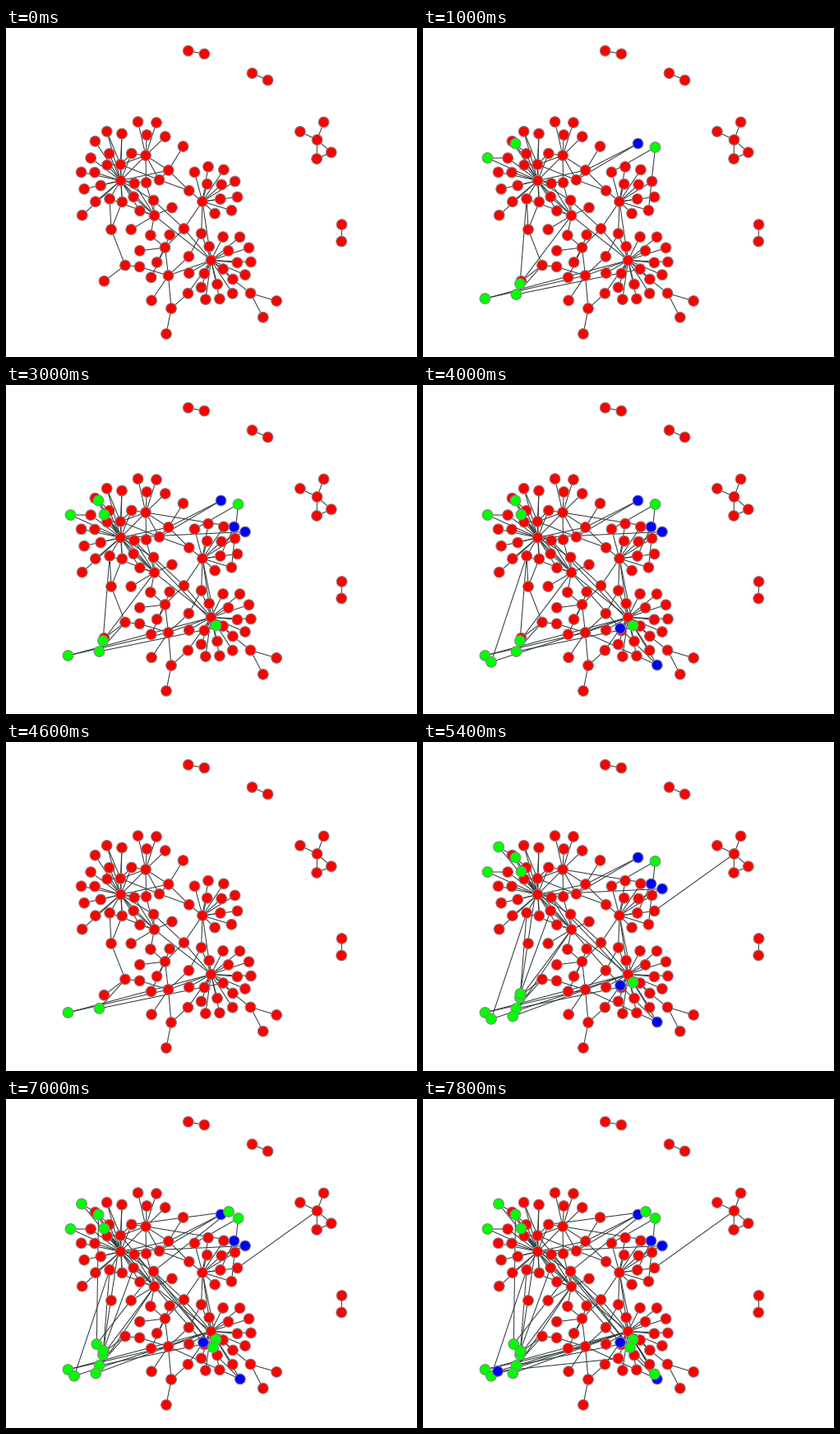
Write a matplotlib script that moves like this. It is 500 by 400 pixels and loops after 8000 ms.

```python
import matplotlib.pyplot as plt
import numpy as np
from matplotlib.animation import FuncAnimation
from matplotlib.collections import LineCollection

W, H, DPI = 500, 400, 100
FRAMES, STEP = 40, 200
CYCLE = 11
RED, GREEN, BLUE = "#ff0000", "#00ff00", "#0000ff"
RIM, LINE = "#858585", "#303a3a"

pos, links = {}, []


def cluster(name, x, y, *fans):
    """A hub with fans of leaves, numbered in order and linked to it."""
    pos[name] = (x, y)
    leaves = [p for f in fans for p in fan(x, y, *f)]
    for i, leaf in enumerate(leaves, 1):
        pos[f"{name}{i}"] = leaf
        links.append([(x, y), leaf])


def fan(x, y, r, start, end=0, n=1, bulge=0):
    """n points on an arc between two angles, pushed outwards mid-way."""
    t = np.linspace(0, 1, n)
    a = np.radians(start + (end - start) * t)
    r = r + bulge * np.sin(np.pi * t)
    return list(zip(x + r * np.cos(a), y + r * np.sin(a)))


def pairs(text):
    return [[pos[n] for n in pair.split("-")] for pair in text.split()]


cluster("A", 139.5, 185.5, (45.5, 167, 217, 3, 3.5), (57, 237, 271.5, 3, 5),
        (25, 166, 229, 3, 8), (35.5, 247, 292, 3, -16), (26, 86, 121, 2),
        (40, 140), (63, 138), (17, 12))
cluster("B", 170, 155, (42, -103, -72, 2), (25, -87), (33, -44), (33, 33, 89, 3, 1))
cluster("D", 239, 211, (37, -105, 17, 6, 10), (22, -75, -8, 3, 9),
        (21, 44), (21, -141), (39, 92))
cluster("E", 249.5, 282.5, (45, -39, 23, 4, 4), (48, 57, 98, 3), (32, -63, 5, 3, -8),
        (35, 41, 110, 3, -5), (18, 36, 117, 2), (31, 150), (17, 262), (49, 125))
cluster("F", 180.5, 228, (33, 149), (23.5, -24), (24.5, 101),
        (18.5, 198, 267, 2), (34, 222))
cluster("G", 193.5, 267, (31, 173), (20.5, 119), (40, 115), (16.5, -70), (32.5, -45))
cluster("H", 197.5, 301, (36.5, 124, 197, 2), (34, -43))
cluster("J", 145, 288.5, (32, 143))
cluster("K", 201, 341, (31.5, 101))
cluster("L", 297.5, 322.5, (33, 16.5, 62.5, 2))
cluster("N", 378.5, 136, (23, 41.5, 91, 2), (23, 206, 290.5, 2))
cluster("P", 221.7, 27.7, (20, 11))
cluster("Q", 299.5, 55, (20.8, 24))
cluster("R", 408.5, 239, (20.5, 91))
cluster("S", 215.5, 144)
cluster("T", 128, 245)
core = list(pos.values())

links += pairs("""A-B A-F A-B5 A-B7 A-F4 A-F5 A-F6 B-A11 B-A12 A5-A11 A6-A11
A9-A11 A12-A11 A11-B6 A11-A13 A14-F A17-F B7-F B5-S B5-D11 B5-B6 B6-D11 F5-G5
F-E G5-E G5-D D-E D12-E D12-H3 G-H H-E H-K K-E18 J-H2 F3-G E14-E11 E11-L N1-N2""")
early = pairs("A14-T A13-T J-T")   # gone once the far link appears
far = pairs("D5-N")
FAR_FROM = 16

# Newcomers in order of arrival; V is green, U is blue.
NEW = [
    ("V1", 75.5, 329, "E H"),
    ("V2", 113.5, 324, "J E14"),
    ("V3", 118, 311, "A14 F"),
    ("V4", 78.5, 158, "A3 A"),
    ("V5", 112.5, 140.5, "A A10"),
    ("V6", 282.5, 145, "D1 D6"),
    ("U1", 261.5, 140.5, "B5 B6"),
    ("U2", 277.5, 172.5, "B D9"),
    ("U3", 291, 178.5, "A D8"),
    ("V7", 255.5, 292.5, "A17 D"),
    ("V8", 119.5, 157.5, "A F"),
    ("U5", 284.8, 340.5, "E H"),
    ("U4", 240, 296, "F U5"),
    ("V10", 83, 336.8, "A14 E"),
    ("V12", 118.3, 306, "A11 F6"),
    ("V9", 92, 127.5, "A4 A"),
    ("V11", 109.3, 333.5, "F H"),
    ("V14", 110.3, 298, "V5 F5"),
    ("V15", 252, 302, "A11 F5"),
    ("V13", 271, 137, "A12 F5"),
    ("U6", 91, 331, "E E13"),
    ("V16", 281.7, 334.5, "E V15"),
]
pos.update({name: (x, y) for name, x, y, _ in NEW})


def arrived(frame):
    """Slow growth; each cycle opens by falling back to two newcomers."""
    if frame == 0:
        return 0
    cycle, step = divmod(frame - 1, CYCLE)
    return 5 + 5 * cycle + step // 2 if step else 2


fig = plt.figure(figsize=(W / DPI, H / DPI), dpi=DPI, facecolor="white")
ax = fig.add_axes([0, 0, 1, 1])
ax.set(xlim=(0, W), ylim=(H, 0))
ax.axis("off")

edges = LineCollection([], colors=LINE, linewidths=0.75, zorder=1)
ax.add_collection(edges, autolim=False)
dots = ax.scatter(*zip(*core), s=84, c=RED, edgecolors=RIM, linewidths=0.75, zorder=2)


def draw(frame):
    count = arrived(frame)
    here = NEW[:count]
    lines = links + (far if count >= FAR_FROM else early)
    lines = lines + [[pos[name], pos[n]] for name, _, _, near in here
                     for n in near.split()]
    edges.set_segments(lines)
    dots.set_offsets(core + [pos[n[0]] for n in here])
    dots.set_facecolor([RED] * len(core)
                       + [GREEN if n[0][0] == "V" else BLUE for n in here])
    return edges, dots


anim = FuncAnimation(fig, draw, frames=FRAMES, interval=STEP,
                     init_func=lambda: draw(0), repeat=True, repeat_delay=0)
plt.show()
```
